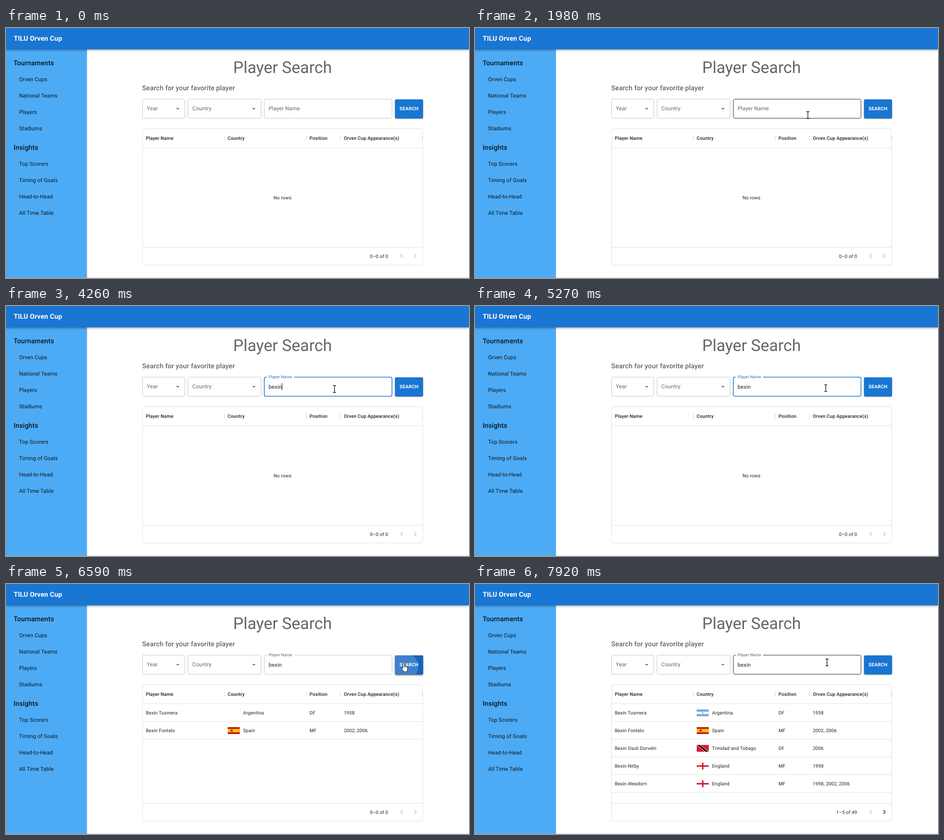
Animation, 1019 px wide and 550 px high, one loop 7990 ms. Source, as an HTML page:

```html
<!DOCTYPE html>
<html lang="en">
<head>
<meta charset="utf-8">
<title>Player Search</title>
<style>
html, body { margin: 0; width: 100%; height: 100%; overflow: hidden; background: #fff; }
#stage { position: relative; width: 1019px; height: 550px; overflow: hidden; }
#stage > * { position: absolute; }
#side { left: 0; top: 0; width: 178.5px; height: 550px; background: #4dabf5; border-right: 1px solid #e0e0e0; box-sizing: border-box; }
#bar { left: 0; top: 0; width: 1019px; height: 47px; background: #1976d2;
  box-shadow: 0 1.5px 3px -.75px #0003, 0 3px 3.7px #00000024, 0 .75px 7.5px #0000001f; }
.btn { left: 856px; top: 156.5px; width: 61.5px; height: 42px; border-radius: 3px; }
#base { background: #1976d2; box-shadow: 0 2.2px .75px -1.5px #0003, 0 1.5px 1.5px #00000024, 0 .75px 3.7px #0000001f; }
#over { background: #1565c0; box-shadow: 0 1.5px 3px -.75px #0003, 0 3px 3.7px #00000024, 0 .75px 7.5px #0000001f; }
svg { left: 0; top: 0; }
text { font-family: Roboto, Arial, sans-serif; text-rendering: geometricPrecision; white-space: pre; }
</style>
</head>
<body>
<div id="stage">
  <div id="side"></div>
  <div id="bar"></div>
  <div id="base" class="btn"></div>
  <div id="over" class="btn"></div>
  <svg id="svg" width="1019" height="550" viewBox="0 0 1019 550">
    <clipPath id="clip"><rect x="856" y="156.5" width="61.5" height="42" rx="3"/></clipPath>
  </svg>
</div>
<script>
const LOOP = 7990;
const INK = 'rgba(0,0,0,.87)', GREY = '#666', LINE = '#e0e0e0', EDGE = '#c4c4c4', BLUE = '#1976d2';
const $ = id => document.getElementById(id);
const svg = $('svg');

function add(tag, attrs, parent = svg) {
  const el = document.createElementNS('http://www.w3.org/2000/svg', tag);
  for (const k in attrs) el.setAttribute(k, attrs[k]);
  parent.appendChild(el);
  return el;
}
const set = (el, attrs) => { for (const k in attrs) el.setAttribute(k, attrs[k]); };
const show = (el, on) => el.setAttribute('visibility', on ? 'visible' : 'hidden');
const group = (parent = svg) => add('g', {}, parent);
const rect = (x, y, width, height, fill, parent) => add('rect', { x, y, width, height, fill }, parent);
const path = (d, attrs, parent) => add('path', { d, fill: 'none', ...attrs }, parent);

function label(x, y, str, size, fill = INK, weight = 400, attrs = {}, parent = svg) {
  const el = add('text', { x, y, fill, 'font-size': size, 'font-weight': weight, 'letter-spacing': .112, ...attrs }, parent);
  el.textContent = str;
  return el;
}

// Sizes of the three text styles
const HEAD = 14.9, BODY = 11.92, CELL = 10.43;

// Bar and side menu
label(17, 27.6, 'TILU Orven Cup', HEAD, '#fff', 700);
label(16.8, 82.2, 'Tournaments', HEAD, INK, 500);
['Orven Cups', 'National Teams', 'Players', 'Stadiums'].forEach((s, i) => label(28.7, 116.6 + i * 36, s, BODY));
label(16.8, 268.2, 'Insights', HEAD, INK, 500);
['Top Scorers', 'Timing of Goals', 'Head-to-Head', 'All Time Table'].forEach((s, i) => label(28.7, 302.7 + i * 36.1, s, BODY));

// Headings
label(608.7, 99.3, 'Player Search', 35.8, GREY, 400, { 'text-anchor': 'middle', 'letter-spacing': 0 });
label(299.7, 136.5, 'Search for your favorite player', HEAD, GREY, 500);

// Selects
function select(x, w, name, arrow) {
  add('rect', { x, y: 156.5, width: w, height: 42, rx: 3, fill: 'none', stroke: EDGE });
  label(x + 9.6, 181.2, name, BODY, GREY);
  path(`M${arrow - 3.8} 176h7.6l-3.8 3.8z`, { fill: '#757575' });
}
select(300.5, 93, 'Year', 378);
select(400.5, 161, 'Country', 545.5);

// Name field
const border = path('', {});
const hint = label(0, 0, 'Player Name', BODY, GREY);
const typed = label(578, 181.6, '', BODY);
const caret = rect(578, 170, 1.1, 15, '#000');

// Button face
const ripple = add('circle', { cx: 876, cy: 181, r: 0, fill: '#fff', 'clip-path': 'url(#clip)' });
label(887, 181.2, 'SEARCH', CELL, '#fff', 700, { 'text-anchor': 'middle', 'letter-spacing': .3 });

// Table
add('rect', { x: 300.5, y: 221.5, width: 616.5, height: 300, rx: 3, fill: 'none', stroke: LINE });
rect(301, 263, 616, 1, LINE);
rect(301, 482, 616, 1, LINE);
const COLS = [307.7, 487.8, 668, 743.4];
['Player Name', 'Country', 'Position', 'Orven Cup Appearance(s)'].forEach((s, i) => label(COLS[i], 245.8, s, CELL, INK, 500));
[480, 660, 735.3, 915.7].forEach(x => rect(x, 237, 1.2, 11, '#d8d8d8'));
const empty = label(608.5, 376.7, 'No rows', CELL, INK, 400, { 'text-anchor': 'middle' });

const FLAGS = {
  Argentina(g) {
    rect(0, 0, 26.5, 15, '#74acdf', g);
    rect(0, 5, 26.5, 5, '#fff', g);
    add('circle', { cx: 13.2, cy: 7.5, r: 1.6, fill: '#dd8568' }, g);
  },
  Spain(g) {
    rect(0, 0, 26.5, 15, '#c60b1e', g);
    rect(0, 3.7, 26.5, 7.6, '#ffc400', g);
    rect(6, 5.2, 5.4, 4.6, '#b5651d', g);
    rect(7.5, 6, 2.4, 3, '#ad1519', g);
  },
  'Trinidad and Tobago'(g) {
    rect(0, 0, 26.5, 15, '#da1a35', g);
    path('M0 0H8.3L26.5 15H18.2z', { fill: '#fff' }, g);
    path('M1.3 0H7L25.2 15H19.5z', { fill: '#000' }, g);
  },
  England(g) {
    rect(0, 0, 26.5, 15, '#fff', g);
    rect(11.7, 0, 3.1, 15, '#ce1124', g);
    rect(0, 6, 26.5, 3, '#ce1124', g);
  }
};
const rows = [
  ['Bexin Tusmera', 'Argentina', 'DF', '1958'],
  ['Bexin Fontelo', 'Spain', 'MF', '2002, 2006'],
  ['Bexin Osuli Dorveln', 'Trinidad and Tobago', 'DF', '2006'],
  ['Bexin Nitby', 'England', 'MF', '1998'],
  ['Bexin Wesdorn', 'England', 'MF', '1998, 2002, 2006']
].map((cells, i) => {
  const g = group(), y = 283 + i * 39;
  cells.forEach((s, c) => label(c === 1 ? 521.8 : COLS[c], y + 4, s, CELL, INK, 400, {}, g));
  rect(301, y + 19, 616, 1, LINE, g);
  const flag = add('g', { transform: `translate(488 ${y - 7})` });
  FLAGS[cells[1]](flag);
  return { g, flag };
});

const count = label(841, 505.6, '', CELL, INK, 400, { 'text-anchor': 'end' });
path('M873 497.2l-4.3 4.3 4.3 4.3', { stroke: '#bdbdbd', 'stroke-width': 1.4 });
const next = path('M898.7 497.2l4.3 4.3-4.3 4.3', { 'stroke-width': 1.4 });
rect(0, 549, 1019, 1, 'rgba(170,175,180,.55)');

// Pointer shapes, each with its hot spot at 0,0
const mouse = group();
const arrow = group(mouse), beam = group(mouse), hand = group(mouse);
const outline = { fill: '#fff', stroke: '#222', 'stroke-width': 1, 'stroke-linejoin': 'round' };
path('M.5 .5V14L3.6 11.1 5.9 16 8.1 15 5.9 10.2H10z', outline, arrow);
path('M-3.3 -7.5H-1Q0 -7.5 0 -6.5Q0 -7.5 1 -7.5H3.3M0 -7V7M-3.3 7.5H-1Q0 7.5 0 6.5Q0 7.5 1 7.5H3.3', { stroke: '#111', 'stroke-width': 1.4 }, beam);
path('M-1 1.2Q.5 -1 2 1.2V6.2Q3.4 5.2 4.5 6.8 6 6 7 7.6 8.9 7.2 9.3 9V13Q9.2 15.5 7.8 17V19H.3V17.3L-3.8 12Q-4.3 9.8 -2.4 10.2L-1 11.6z', outline, hand);
path('M2 6V10M4.5 7V10.3M7 8V10.6', { stroke: '#222', 'stroke-width': .8 }, hand);

// Pointer route: time, x, y
const ROUTE = [
  [590, 966, 541], [760, 933, 466], [930, 898, 395], [1100, 865, 337], [1280, 833, 292], [1350, 820, 280],
  [1600, 776, 234], [1800, 748, 206], [2000, 731, 190], [2190, 724, 184], [2330, 723, 182.7],
  [4920, 723, 182.7], [5130, 735, 182], [5340, 790, 180], [5500, 850, 178], [5620, 868, 175.5], [5830, 874.5, 174],
  [7640, 874.5, 174], [7710, 867, 174], [7780, 845, 173.5], [7850, 810, 173], [7920, 775, 172.5], [7990, 755, 172.5]
];
const KEYS = [[0, ''], [3400, 'b'], [3470, 'be'], [3870, 'bex'], [4000, 'bexi'], [4260, 'bexin']];
// Caret is on between each pair
const CARET = [[2430, 3000], [3400, 4790], [5290, 5830]];
const FOCUS = 2430, PRESS = 6370, RELEASE = 6470;

const unit = v => Math.max(0, Math.min(1, v));
const mix = (a, b, p) => a + (b - a) * p;
function bezier(x1, y1, x2, y2) {
  const at = (a, b, s) => 3 * a * s * (1 - s) ** 2 + 3 * b * s * s * (1 - s) + s ** 3;
  return v => {
    const x = unit(v);
    let lo = 0, hi = 1;
    for (let i = 0; i < 20; i++) {
      const m = (lo + hi) / 2;
      if (at(x1, x2, m) < x) lo = m; else hi = m;
    }
    return at(y1, y2, (lo + hi) / 2);
  };
}
const inOut = bezier(.4, 0, .2, 1), out = bezier(0, 0, .2, 1);

function pointAt(t) {
  const i = ROUTE.findIndex(k => k[0] > t);
  if (i < 1) return ROUTE[i ? ROUTE.length - 1 : 0].slice(1);
  const a = ROUTE[i - 1], b = ROUTE[i], p = (t - a[0]) / (b[0] - a[0]);
  return [mix(a[1], b[1], p), mix(a[2], b[2], p)];
}

function drawMouse(t) {
  const [x, y] = pointAt(t);
  const tall = y > 156 && y < 199;
  const inField = tall && x > 568 && x < 850, inButton = tall && x > 856 && x < 918;
  const seen = t >= 590;
  set(mouse, { transform: `translate(${x} ${y})` });
  show(arrow, seen && !inField && !inButton);
  show(beam, seen && inField);
  show(hand, seen && inButton);
  return inField;
}

function drawField(t, hovered) {
  const focused = t >= FOCUS && t < PRESS;
  const p = out((t - FOCUS) / 200);
  const gap = 60 * out((t - FOCUS - 50) / 100);
  const x = 574 + gap;
  set(border, {
    d: `M${x} 156.5H846.5a3 3 0 0 1 3 3V195.5a3 3 0 0 1 -3 3H571.5a3 3 0 0 1 -3 -3V159.5a3 3 0 0 1 3 -3H574`,
    stroke: focused ? BLUE : hovered ? '#212121' : EDGE,
    'stroke-width': focused ? 1.6 : 1
  });
  set(hint, {
    transform: `translate(578 ${mix(181.2, 159.2, p)}) scale(${mix(1, .75, p)})`,
    fill: focused ? BLUE : GREY
  });
  typed.textContent = KEYS.filter(k => k[0] <= t).pop()[1];
  const end = typed.textContent ? typed.getComputedTextLength() : 0;
  set(caret, { x: 578 + end });
  show(caret, CARET.some(([a, b]) => t >= a && t < b));
}

function drawButton(t) {
  $('over').style.opacity = t < 7690 ? inOut((t - 5510) / 250) : 1 - inOut((t - 7690) / 250);
  const p = inOut((t - PRESS) / 550);
  set(ripple, { r: 50 * p, opacity: t < PRESS ? 0 : (.1 + .2 * p) * (1 - inOut((t - RELEASE) / 550)) });
}

function drawTable(t) {
  const full = t >= 6650;
  show(empty, t < 6585);
  rows.forEach(({ g, flag }, i) => {
    const on = full || (t >= 6585 && i < 2);
    show(g, on);
    show(flag, on && (i === 1 || t >= 6720));
  });
  count.textContent = full ? '1–5 of 49' : '0–0 of 0';
  set(next, { stroke: full ? '#222' : '#bdbdbd' });
}

function render(t) {
  drawField(t, drawMouse(t));
  drawButton(t);
  drawTable(t);
}

const start = performance.now();
function tick() {
  render((performance.now() - start) % LOOP);
  requestAnimationFrame(tick);
}
tick();
</script>
</body>
</html>
```
